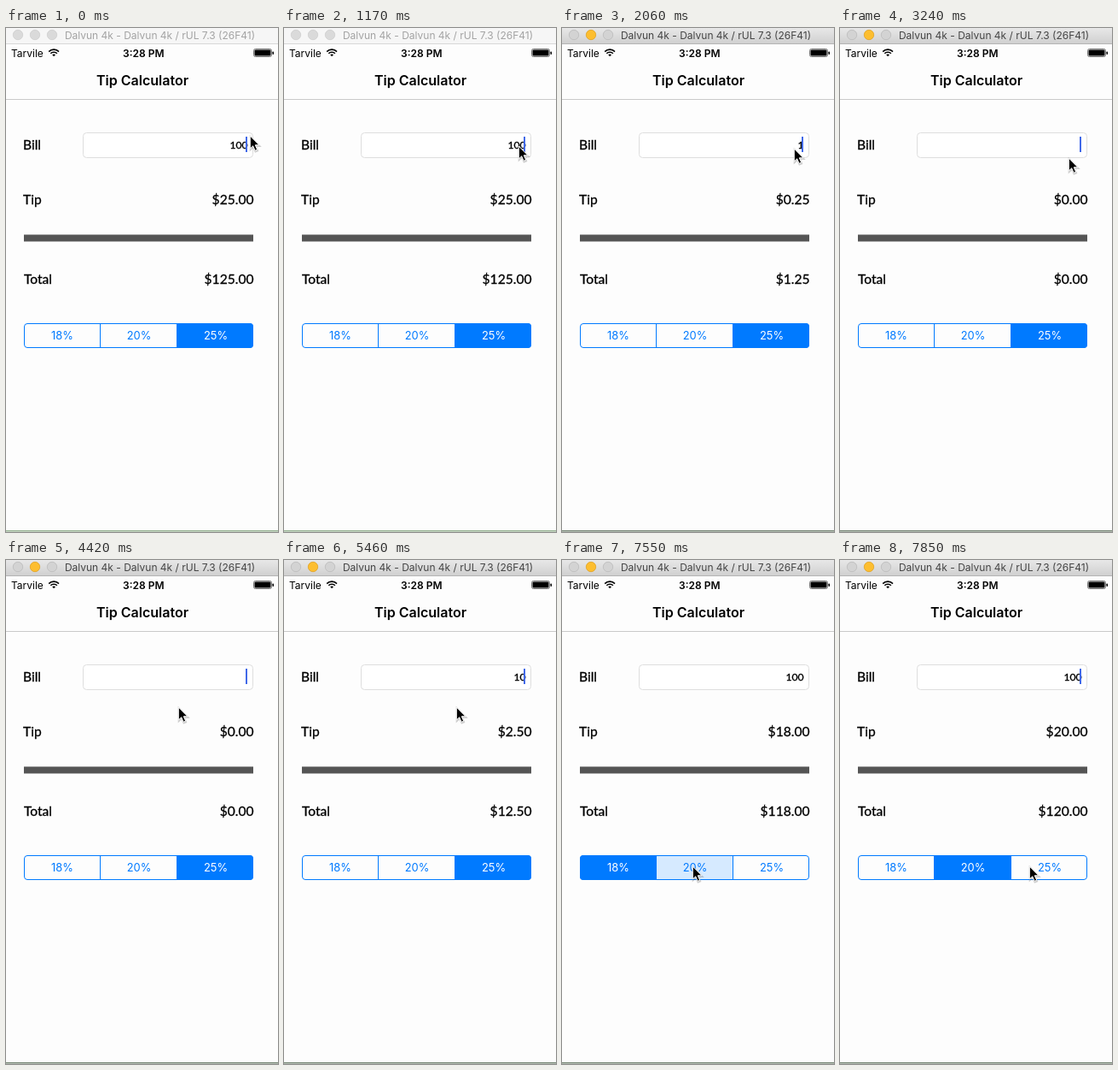
Animation of 319x589 px, one loop 8 s. Source, as an HTML page:

```html
<!DOCTYPE html>
<html lang="en">
<head>
<meta charset="utf-8">
<title>Tip Calculator</title>
<style>
  html, body { margin: 0; width: 100%; height: 100%; overflow: hidden; background: #fff; }
  svg { display: block; width: 100%; height: 100%; }
  text { font-family: Inter, "Open Sans", sans-serif; }
  .label { font: 15.6px Lato, sans-serif; stroke: #000; stroke-width: .3; }
  .end { text-anchor: end; }
  .mid { text-anchor: middle; }
  .bold { font-weight: 600; }
</style>
</head>
<body>
<svg viewBox="0 0 319 589">
  <defs>
    <linearGradient id="chrome" x2="0" y2="1">
      <stop offset="0" stop-color="#e8e8e8"/>
      <stop offset="1" stop-color="#d0d0d0"/>
    </linearGradient>
    <clipPath id="pill"><rect x="21" y="345" width="269" height="29" rx="4"/></clipPath>
  </defs>
  <rect width="319" height="589" fill="#fdfdfd"/>

  <!-- window bar -->
  <rect id="bar" width="319" height="18"/>
  <rect id="barEdge" y="18" width="319" height="1"/>
  <g id="lights" stroke-width=".8">
    <circle cx="14" cy="8" r="5.7"/><circle cx="34" cy="8" r="5.7"/><circle cx="54" cy="8" r="5.7"/>
  </g>
  <text id="caption" class="mid" x="180.5" y="12.6" font-size="12">Dalvun 4k - Dalvun 4k / rUL 7.3 (26F41)</text>

  <!-- status bar -->
  <text x="6" y="33.5" font-size="12">Tarvile</text>
  <g fill="none" stroke="#000" stroke-width="1.6">
    <path d="M50.2 27.6a8.3 8.3 0 0 1 11.8 0M52.3 29.8a5.3 5.3 0 0 1 7.6 0"/>
    <path d="M54.2 31.2L56.1 33.2 58 31.2Q56.1 29.8 54.2 31.2Z" fill="#000" stroke="none"/>
  </g>
  <text class="mid bold" x="161.3" y="33.5" font-size="12">3:28 PM</text>
  <rect x="290.5" y="24.5" width="21" height="9" rx="2" fill="none" stroke="#777"/>
  <rect x="291.5" y="25.5" width="19" height="7" rx="1"/>
  <rect x="312.5" y="27.5" width="1.5" height="3.5" rx=".7"/>

  <text class="mid bold" x="160" y="67" font-size="16">Tip Calculator</text>
  <rect y="83" width="319" height="1" fill="#cacaca"/>

  <!-- form -->
  <text class="label" x="20" y="142">Bill</text>
  <text class="label" x="20" y="206">Tip</text>
  <text class="label" x="21" y="299">Total</text>
  <rect x="90.5" y="122.5" width="199" height="29" rx="4" fill="#fff" stroke="#dedede"/>
  <text id="bill" class="label end" x="283.6" y="141" style="font-size:12.2px"></text>
  <rect id="caret" x="281" y="127" width="2" height="18" fill="#4169e8"/>
  <text id="tip" class="label end" x="290.5" y="206"></text>
  <rect x="21" y="241.5" width="269" height="8" fill="#555"/>
  <text id="total" class="label end" x="290.5" y="299"></text>

  <g id="segments" clip-path="url(#pill)"></g>
  <path d="M110.5 345v29M200.5 345v29" stroke="#007aff"/>
  <rect x="21.5" y="345.5" width="268" height="28" rx="3.5" fill="none" stroke="#007aff"/>

  <rect id="floor" y="587" width="319" height="1.5"/>

  <!-- edit menu -->
  <g id="menu">
    <path d="M148 73H302a8 8 0 0 1 8 8V101a8 8 0 0 1-8 8H291.5L282 118 272.500 109H148a8 8 0 0 1-8-8V81a8 8 0 0 1 8-8Z" fill="#343434"/>
    <path d="M214.5 73v36" stroke="#999"/>
    <g class="mid" fill="#fff" font-size="13.4">
      <text x="178" y="96">Select</text><text x="263" y="96">Select All</text>
    </g>
  </g>

  <g id="pointer">
    <path id="arrow" d="M.3 1V16L3.700 12.800 6.100 18.300 8.700 17.200 6.300 11.800H11Z" stroke="#fff"/>
  </g>
</svg>
<script>
const LOOP = 8000;
const RATES = [18, 20, 25];
const BLUE = '#007aff';
const $ = id => document.getElementById(id);

// Each step lists only what changes from the step before it.
const steps = [
  [0, { at: [286, 125], caret: 1, bill: '100', rate: 25, press: 0, menu: false, focus: false }],
  [290, { caret: .5 }], [440, { caret: 0 }],
  [740, { caret: .5 }], [890, { caret: 1, at: [281, 131] }],
  [1030, { at: [275, 137] }], [1180, { at: [272, 140], focus: true }],
  [1320, { caret: .5 }], [1470, { caret: 1 }],
  [1760, { menu: true }], [1910, { menu: false, bill: '10' }],
  [2060, { bill: '1' }], [2210, { bill: '' }],
  [2650, { caret: .5 }], [2800, { caret: 0 }],
  [2950, { at: [270, 145] }], [3090, { caret: .5, at: [268, 151] }], [3240, { caret: 1 }],
  [3680, { caret: .5, at: [245, 168] }], [3830, { caret: 0, at: [190, 196] }],
  [3980, { at: [143, 210] }], [4120, { caret: .5, at: [164, 198] }],
  [4270, { caret: 1, at: [190, 179] }], [4420, { at: [202, 171] }],
  [4710, { caret: .5 }], [4860, { caret: 0 }],
  [5160, { caret: 1 }], [5310, { bill: '1' }], [5460, { bill: '10' }], [5760, { bill: '100' }],
  [6210, { caret: .5 }], [6360, { caret: 0 }],
  [6660, { at: [75, 335] }], [6810, { caret: .5, at: [67, 356] }],
  [6960, { caret: 1, press: 18 }], [7110, { press: 0, rate: 18 }],
  [7260, { caret: .5, at: [78, 357] }], [7400, { caret: 0, at: [120, 357] }],
  [7550, { at: [153, 357], press: 20 }], [7700, { caret: .5 }],
  [7850, { caret: 1, at: [222, 357], press: 0, rate: 20 }]
];

let state = {};
const timeline = steps.map(([time, change]) => ({ time, ...(state = { ...state, ...change }) }));

$('segments').innerHTML = RATES.map((rate, i) =>
  `<rect x="${21 + 90 * i}" y="345" width="90" height="29"/>` +
  `<text class="mid" x="${66 + 90 * i}" y="364" font-size="12.9">${rate}%</text>`).join('');
const cells = [...$('segments').querySelectorAll('rect')];
const names = [...$('segments').querySelectorAll('text')];

const fill = (node, color) => node.setAttribute('fill', color);
const money = value => '$' + value.toFixed(2);

function drawWindow(focus) {
  fill($('bar'), focus ? 'url(#chrome)' : '#f6f6f6');
  fill($('barEdge'), focus ? '#b4b4b4' : '#d8d8d8');
  fill($('caption'), focus ? '#454545' : '#a3a3a3');
  fill($('floor'), focus ? '#71816f' : '#91ae8d');
  [...$('lights').children].forEach((light, i) => {
    const lit = focus && i === 1;
    fill(light, lit ? '#fdbe2f' : focus ? '#d3d3d3' : '#dadada');
    light.setAttribute('stroke', lit ? '#e0a324' : focus ? '#bcbcbc' : '#cecece');
  });
}

function draw({ at, caret, bill, rate, press, menu, focus }) {
  const tip = bill * rate / 100;
  drawWindow(focus);
  $('bill').textContent = bill;
  $('tip').textContent = money(tip);
  $('total').textContent = money(+bill + tip);
  $('caret').setAttribute('opacity', caret);
  $('menu').setAttribute('visibility', menu ? 'visible' : 'hidden');
  $('pointer').setAttribute('transform', `translate(${at})`);
  RATES.forEach((r, i) => {
    fill(cells[i], r === rate ? BLUE : r === press ? '#d6eaff' : '#fdfdfd');
    fill(names[i], r === rate ? '#fff' : BLUE);
  });
}

// A soft shadow sits under the arrow.
const shadow = $('arrow').cloneNode();
shadow.removeAttribute('id');
shadow.setAttribute('style', 'stroke:#000;stroke-width:2;opacity:.18;transform:translate(.4px,1.2px)');
$('pointer').prepend(shadow);

let shown;
function tick() {
  const time = performance.now() % LOOP;
  const step = timeline.findLast(s => s.time <= time);
  if (step !== shown) draw(shown = step);
  requestAnimationFrame(tick);
}
tick();
</script>
</body>
</html>
```
